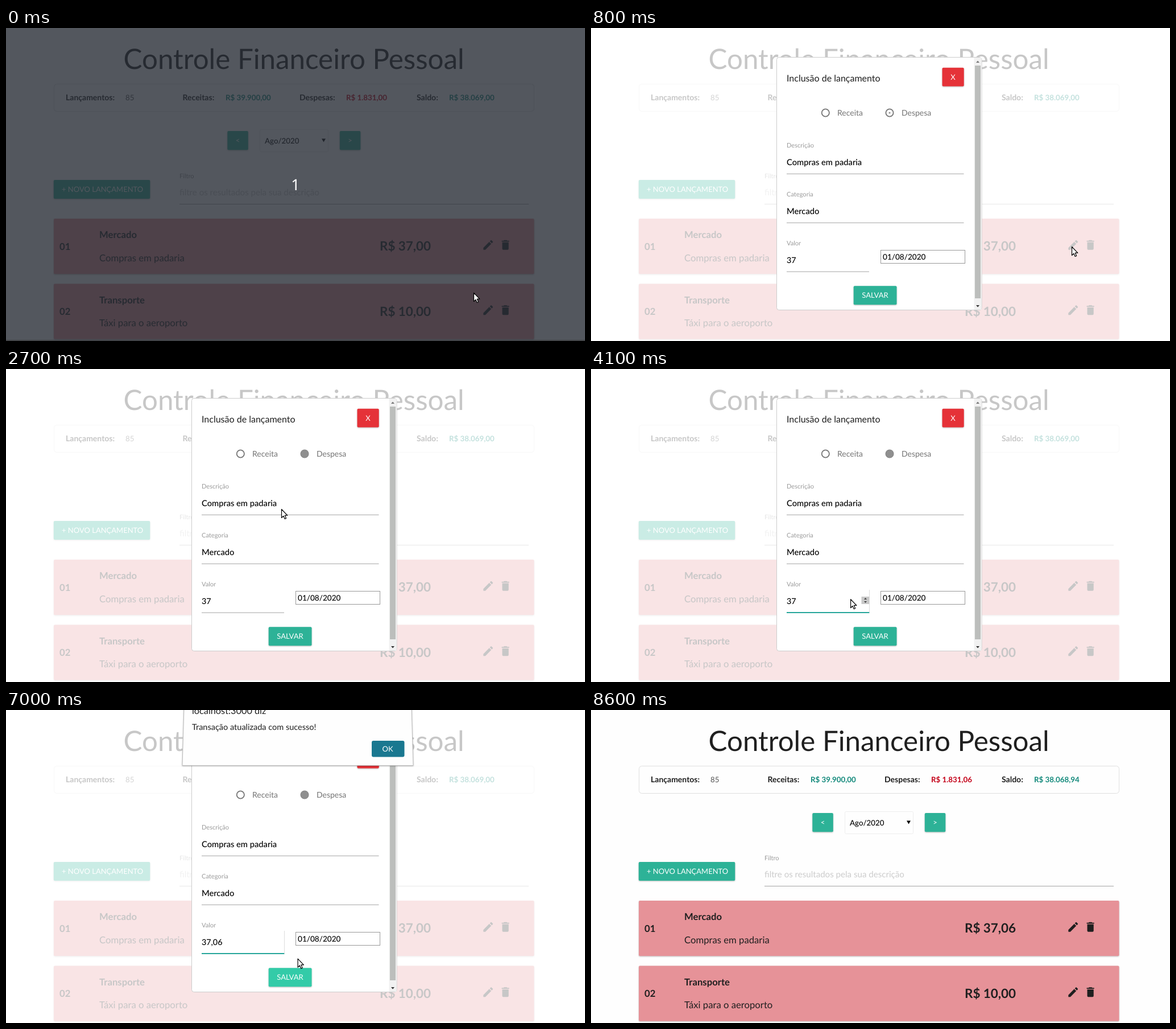
Animation, 1018 px wide and 550 px high, one loop 9300 ms. Source, as an HTML page:

```html
<!DOCTYPE html>
<html lang="pt-BR">
<head>
<meta charset="utf-8">
<title>Controle Financeiro Pessoal</title>
<style>
  html, body { margin: 0; width: 100%; height: 100%; overflow: hidden; background: #fefefe; }
  svg { display: block; }
  text { font-family: Lato, sans-serif; text-rendering: geometricPrecision; fill: #1f1f1f; white-space: pre; }
  .b { font-weight: bold; }
  .mid { text-anchor: middle; }
  .s11 { font-size: 11.1px; fill: #9b9b9b; }
  .s13 { font-size: 13.3px; }
  .s14 { font-size: 14px; }
  .s15 { font-size: 14.7px; }
  .s16 { font-size: 16.7px; }
  .s22 { font-size: 22.4px; }
  .grey { fill: #757575; }
  .black { fill: #000; font-weight: 500; }
  .white { fill: #fff; font-size: 13px; }
  .gain { fill: #12897b; }
  .loss { fill: #c40018; }
  .btn { fill: #2db297; }
  .lift { filter: drop-shadow(0 1.5px 1px rgba(0, 0, 0, .25)); }
  .card { fill: #e69298; }
  .line { stroke: #a4a4a4; fill: none; }
</style>
</head>
<body>
<svg width="1018" height="550" viewBox="0 0 1018 550">
  <defs>
    <g id="icons" fill="#1f1f1f" transform="scale(.935)">
      <path d="M3 17.25V21h3.75L17.81 9.94l-3.75-3.75zM20.71 7.04a1 1 0 0 0 0-1.41l-2.34-2.34a1 1 0 0 0-1.41 0l-1.83 1.83 3.75 3.75z"/>
      <path transform="translate(32.500)" d="M6 19a2 2 0 0 0 2 2h8a2 2 0 0 0 2-2V7H6zM19 4h-3.5l-1-1h-5l-1 1H5v2h14z"/>
    </g>
  </defs>

  <rect width="1018" height="550" fill="#fefefe"/>
  <g id="page">
    <text x="206.500" y="72" font-size="49.3">Controle Financeiro Pessoal</text>

    <rect x="84.500" y="98.500" width="844" height="48" rx="5" fill="none" stroke="#e0e0e0"/>
    <text class="b s14" x="105" y="127">Lançamentos:</text>
    <text class="s13" x="210" y="127" style="fill:#555">85</text>
    <text class="b s14" x="310.500" y="127">Receitas:</text>
    <text class="b s13 gain" x="386" y="127">R$ 39.900,00</text>
    <text class="b s14" x="516" y="127">Despesas:</text>
    <text class="b s13 loss" x="598" y="127" id="expenses"></text>
    <text class="b s14" x="722" y="127">Saldo:</text>
    <text class="b s13 gain" x="779" y="127" id="balance"></text>

    <rect class="btn lift" x="389.300" y="181" width="36.500" height="33.300" rx="2"/>
    <text class="white mid" x="407.500" y="202">&lt;</text>
    <rect x="446.500" y="178.500" width="120" height="39" rx="2" fill="none" stroke="#eee"/>
    <text class="s13 black" x="455" y="203">Ago/2020</text>
    <path d="M555 194.500h7l-3.500 6z"/>
    <rect class="btn lift" x="586.800" y="181" width="36.500" height="33.300" rx="2"/>
    <text class="white mid" x="605" y="202">&gt;</text>

    <rect class="btn lift" x="83.800" y="267" width="169.500" height="33" rx="2"/>
    <text class="white" x="98" y="288">+ NOVO LANÇAMENTO</text>
    <text class="s11" x="305" y="263.500">Filtro</text>
    <text x="305" y="294" font-size="15.1" style="fill:#ccc">filtre os resultados pela sua descrição</text>
    <path class="line" d="M305 309.500H919"/>

    <g>
      <rect class="card lift" x="84" y="335" width="844.500" height="97.300" rx="2"/>
      <text class="b s16" x="94" y="389.500">01</text>
      <text class="b s16" x="164" y="369">Mercado</text>
      <text class="s16" x="164" y="409.500">Compras em padaria</text>
      <text class="b s22" x="657" y="391" id="price"></text>
      <use href="#icons" x="836.500" y="370"/>
    </g>
    <g>
      <rect class="card lift" x="84" y="449.500" width="844.500" height="97.300" rx="2"/>
      <text class="b s16" x="94" y="504">02</text>
      <text class="b s16" x="164" y="483.500">Transporte</text>
      <text class="s16" x="164" y="524">Táxi para o aeroporto</text>
      <text class="b s22" x="657" y="505.500">R$ 10,00</text>
      <use href="#icons" x="836.500" y="484.500"/>
    </g>
  </g>

  <g id="modal">
    <rect width="1018" height="550" fill="#fff" opacity=".75"/>
    <rect x="326.500" y="51.500" width="360.500" height="444" rx="4" fill="#fff" stroke="#ccc"/>
    <rect x="673.500" y="52" width="13" height="443" fill="#f1f1f1"/>
    <rect x="675" y="66" width="10" height="409" fill="#bcbebc"/>
    <path d="M677 61h6l-3-3.500z" fill="#777"/>
    <path d="M677 487h6l-3 3.500z" fill="#333"/>

    <text x="344" y="94" font-size="16">Inclusão de lançamento</text>
    <rect class="lift" x="617.500" y="69.700" width="38.200" height="32.800" rx="2" fill="#e53238"/>
    <text class="white mid" x="636.500" y="91">X</text>

    <g fill="none" stroke="#757575" stroke-width="1.800">
      <circle cx="412.300" cy="149" r="6.600"/>
      <circle cx="525" cy="149" r="6.600"/>
    </g>
    <circle id="dot" cx="525" cy="149" fill="#8f8f8f"/>
    <text class="s14 grey" x="433" y="154">Receita</text>
    <text class="s14 grey" x="546" y="154">Despesa</text>

    <text class="s11" x="344" y="210">Descrição</text>
    <text class="s15 black" x="344" y="241">Compras em padaria</text>
    <text class="s11" x="344" y="296">Categoria</text>
    <text class="s15 black" x="344" y="327">Mercado</text>
    <text class="s11" x="344" y="382">Valor</text>
    <text class="black" x="344" y="413" font-size="14.3" id="amount"></text>
    <path class="line" d="M344 256.300H655.500M344 342.300H655.500M344 428.200H489"/>
    <path id="focus" d="M344 428H489.500" stroke="#26a69a" stroke-width="2"/>
    <path id="edge" d="M489.500 388V428" stroke="#ddd"/>
    <path id="caret" d="M.5 400V416" stroke="#000"/>
    <g id="spinner">
      <rect x="475.500" y="400" width="13.500" height="13" fill="#c8c8c8"/>
      <path d="M480 405h5l-2.500-3zM480 408h5l-2.500 3z" fill="#444"/>
    </g>
    <rect x="509.500" y="390.500" width="148" height="23" fill="#fff" stroke="#999"/>
    <text class="black" x="513" y="407" font-size="13.6">01/08/2020</text>
    <rect id="save" class="lift" x="461.700" y="453.300" width="75.800" height="33" rx="2"/>
    <text class="white mid" x="499.500" y="474">SALVAR</text>
  </g>

  <g id="alert">
    <path class="lift" d="M313 -4H713L716 97.500H310z" fill="#fefefe" stroke="#bbb"/>
    <text x="327" y="7" font-size="16.3">localhost:3000 diz</text>
    <text x="327" y="35" font-size="14.5">Transação atualizada com sucesso!</text>
    <rect x="643" y="54" width="57.500" height="28.500" rx="3" fill="#1a7890"/>
    <text class="white mid" x="671" y="73">OK</text>
  </g>

  <g id="countdown">
    <rect width="1018" height="550" fill="#292e36" opacity=".8"/>
    <rect y="548" width="1018" height="2" fill="#333" opacity=".5"/>
    <text class="mid" x="509" y="284.500" font-size="27" style="fill:#fff;font-family:'Noto Sans',sans-serif">1</text>
  </g>

  <g id="pointer" fill="#fff" stroke="#000" stroke-width="1.200" stroke-linejoin="round">
    <path id="arrow" d="M.5 .5V15.500L3.800 12.300 6.200 17.500 8.600 16.500 6.300 11.200H10.800z"/>
    <path id="beam" d="M-3 -8.500H3M0 -8.500V8.500M-3 8.500H3"/>
    <path id="hand" d="M-1.500 1Q0 -.8 1.500 1V6Q3 4.800 4.200 6.200 5.800 5.300 6.500 7 8.800 6.500 8.800 9V12L7 15.500H-.5L-4 10Q-4.500 7.500 -1.500 9z"/>
  </g>
</svg>
<script>
  const LOOP = 9300, STEP = 100;
  const el = {};
  document.querySelectorAll('[id]').forEach(node => el[node.id] = node);

  // Pointer stops: time, x, y
  const stops = [
    [0, 822, 465], [100, 828, 451], [600, 845, 384], [1400, 845, 384], [1500, 862, 401],
    [2400, 486, 246], [2600, 486, 242], [2700, 484, 246], [2900, 426, 404], [3100, 426, 404],
    [3600, 440, 404], [3900, 447, 405], [4000, 447, 405], [4300, 482, 402], [6000, 482, 402],
    [6300, 500, 466], [6900, 500, 466], [7500, 670, 70], [8100, 670, 70], [8600, 200, -24]
  ];
  // Clicks on the spinner, one cent each
  const clicks = [4800, 4900, 5300, 5700, 5800, 6000];

  const clamp = v => Math.max(0, Math.min(1, v));
  const within = (t, from, to) => t >= from && t < to;
  const show = (name, visible) => el[name].style.display = visible ? '' : 'none';
  const setText = (name, value) => el[name].textContent = value;

  function pointerAt(t) {
    const next = stops.findIndex(stop => stop[0] > t);
    if (next < 0) return stops[stops.length - 1].slice(1);
    const [t0, x0, y0] = stops[next - 1], [t1, x1, y1] = stops[next];
    const p = (t - t0) / (t1 - t0), e = p * p * (3 - 2 * p);
    return [x0 + (x1 - x0) * e, y0 + (y1 - y0) * e];
  }

  function drawPointer(t) {
    const beam = within(t, 2900, 4100);
    const hand = within(t, 6300, 6500) || within(t, 7500, 8000);
    show('beam', beam);
    show('hand', hand);
    show('arrow', !beam && !hand);
    el.pointer.setAttribute('transform', `translate(${pointerAt(t)})`);
  }

  function drawModal(t) {
    show('modal', within(t, 800, 8000));
    el.dot.setAttribute('r', 7 * clamp((t - 750) / 220));
    const cents = clicks.filter(c => c <= t).length;
    setText('amount', cents ? `37,0${cents}` : '37');
    show('focus', t >= 3200);
    el.focus.style.opacity = t < 7800 ? 1 : .4;
    show('edge', t >= 3200);
    show('spinner', within(t, 3200, 6100));
    const caretOn = within(t, 3300, 3800) || within(t, 4800, 6200);
    show('caret', caretOn);
    if (caretOn) {
      const x = 344 + Math.round(el.amount.getComputedTextLength());
      el.caret.setAttribute('transform', `translate(${x})`);
    }
    el.save.setAttribute('fill', t < 6300 ? '#2db297' : '#33cba8');
  }

  function draw(t) {
    const saved = t >= 8200;
    setText('expenses', saved ? 'R$ 1.831,06' : 'R$ 1.831,00');
    setText('balance', saved ? 'R$ 38.068,94' : 'R$ 38.069,00');
    setText('price', saved ? 'R$ 37,06' : 'R$ 37,00');
    show('countdown', t < 100);
    show('alert', within(t, 6400, 8000));
    el.alert.style.opacity = t < 7700 ? clamp((t - 6300) / 300) : t < 7800 ? .6 : .18;
    drawModal(t);
    drawPointer(t);
  }

  const start = performance.now();
  function tick() {
    const t = (performance.now() - start) % LOOP;
    draw(Math.floor(t / STEP) * STEP);
    requestAnimationFrame(tick);
  }
  tick();
</script>
</body>
</html>
```
